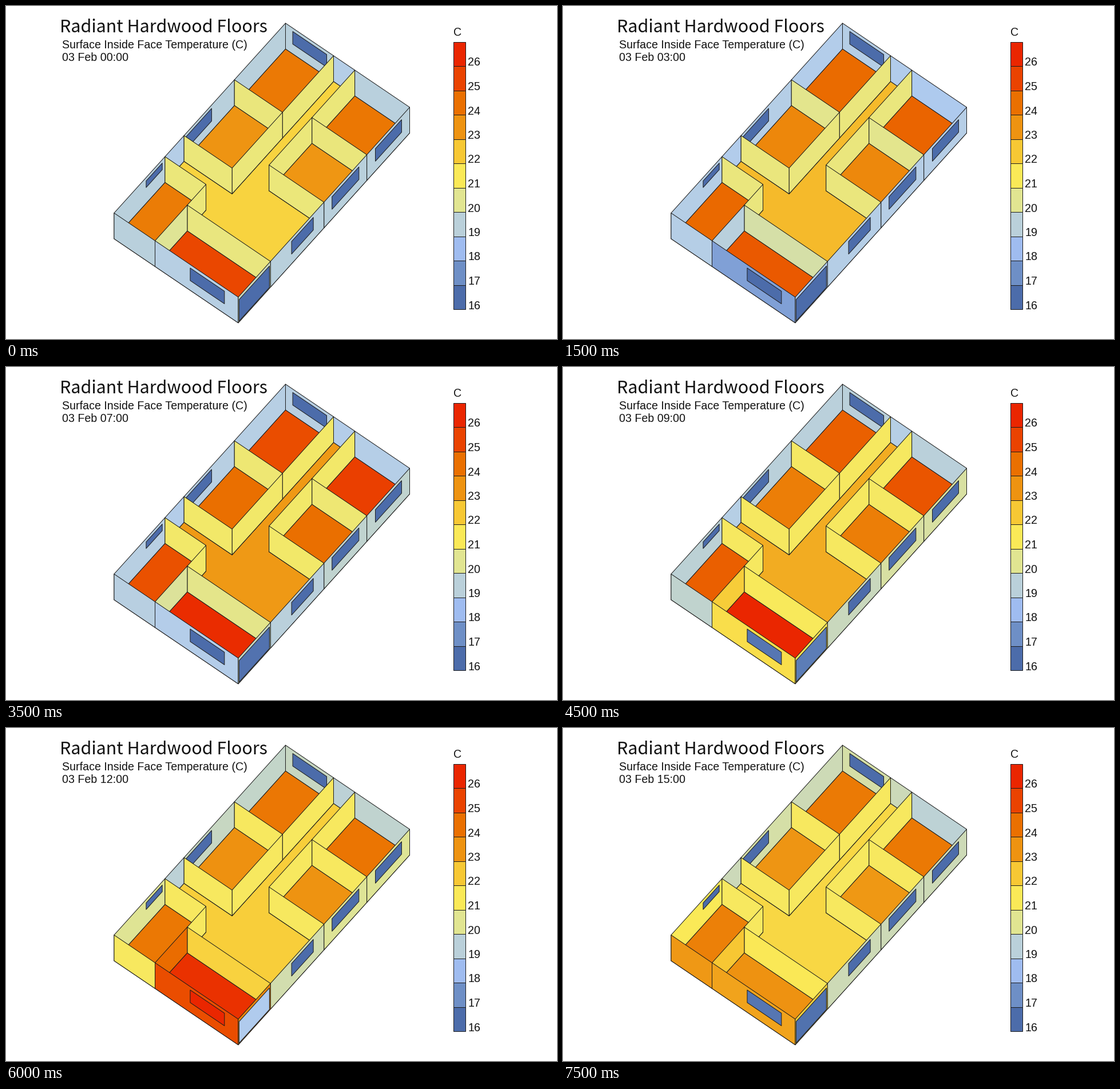
Recreate the animation shown at these times as a matplotlib script. Size 963 px wide and 582 px high, loop 8000 ms.

```python
import numpy as np
import matplotlib.pyplot as plt
from matplotlib.animation import FuncAnimation
from matplotlib.colors import to_rgb
from matplotlib.patches import Polygon, Rectangle

W, H, DPI = 963, 582, 96
HOURS, STEP_MS = 16, 500
INK = "#1c1c1c"

# Temperature scale, 16 to 26 degrees
SCALE = ["#4c6caa", "#6e8fc6", "#9fbcf0", "#bad0da", "#e1e591", "#fae957",
         "#f7c834", "#ee9311", "#ea7000", "#ea4300", "#ea2600"]
stops = dict(zip(range(16, 27), SCALE))
stops.update({18.5: "#b0cbee", 18.75: "#b7cfe4"})
STOP_T = sorted(stops)
STOP_RGB = np.array([to_rgb(stops[t]) for t in STOP_T])

# Plan axes on screen: u runs along the short side, v along the long side
ORIGIN = np.array([488, 29.5])
U, V = np.array([217, 147]), np.array([-299.6, 331.8])
DOWN = np.array([0, 1])
WALL = 45

# Partition lines of the plan
U1, U2, U3 = 0.387, 0.558, 0.33
V1, V2, V3, V4 = 0.298, 0.592, 0.703, 0.812
E1, E2 = 0.25, 0.5


def bump(centre, width):
    return lambda h: np.exp(-((h - centre) / width) ** 2)


# Daily influences on a surface
CYCLES = dict(
    night=bump(4.5, 3),
    heat=bump(6.5, 3.5),
    slow=bump(6.5, 4.5),
    am=bump(10.5, 3.5),
    noon=bump(12, 3.5),
    peak=bump(12, 1.6),
    pm=bump(15, 3.5),
    day=lambda h: 1 / (1 + np.exp(6 - h)),
)


def color(hour, base, gains):
    t = base + sum(k * CYCLES[name](hour) for name, k in gains.items())
    return [np.interp(t, STOP_T, STOP_RGB[:, i]) for i in range(3)]


fig = plt.figure(figsize=(W / DPI, H / DPI), dpi=DPI, facecolor="white")
ax = fig.add_axes([0, 0, 1, 1])
ax.set_xlim(-0.5, W - 0.5)
ax.set_ylim(H - 0.5, -0.5)
ax.axis("off")

surfaces = []


def at(p, drop=0):
    return ORIGIN + p[0] * U + p[1] * V + drop * DOWN


def add(pts, base, gains):
    poly = Polygon(pts, closed=True, ec=INK, lw=0.75, joinstyle="round",
                   zorder=2 + 0.01 * len(surfaces))
    ax.add_patch(poly)
    surfaces.append((poly, base, gains))


def floor(corners, base, **gains):
    add([at(c, WALL) for c in corners], base, gains)


def room(u0, v0, u1, v1, base, **gains):
    floor([(u0, v0), (u1, v0), (u1, v1), (u0, v1)], base, **gains)


def wall(p, q, base, top=0, height=WALL, **gains):
    add([at(p, top), at(q, top), at(q, top + height), at(p, top + height)],
        base, gains)


def outer(p, q, base=19, night=-0.4, **gains):
    wall(p, q, base, night=night, **gains)


def inner(p, q, night=-0.1):
    wall(p, q, 20.4, night=night, day=0.47)


def window(p, q, height=22, **gains):
    wall(p, q, 16, top=6, height=height, **gains)


def label(x, y, s, px=19.6, font="Liberation Sans"):
    return ax.text(x, y, s, fontsize=px * 72 / DPI, family=font,
                   color="#111111", va="baseline", ha="left", zorder=5)


# Floors
floor([(U1, 0), (U2, 0), (U2, E2), (1, E2), (1, V4), (U3, V4), (U3, V3),
       (0, V3), (0, V2), (U1, V2)], 21.5, slow=1.4)
room(0, 0, U1, V1, 23.7, heat=1.1)
room(0, V1, U1, V2, 22.95, heat=1.1)
room(U2, 0, 1, E1, 23.75, heat=1.4)
room(U2, E1, 1, E2, 22.9, heat=1.15)
room(0, V3, U3, 1, 23.5, slow=1.2)
room(U3, V4, 1, 1, 25, night=-1.2, heat=1.2, noon=1.9, pm=-2.9)

# Outer walls seen from inside
outer((0, 0), (0, V1), night=-0.5, pm=0.5)
outer((0, 0), (U1, 0), pm=0.7)
outer((0, V1), (0, V2), pm=0.7)
outer((0, V2), (0, V3), 18.7, night=-0.15, pm=0.75)
outer((U1, 0), (U2, 0), 18.7, night=-0.15, pm=0.75)
outer((U2, 0), (1, 0), night=-0.7, noon=0.15)
outer((0, V3), (0, 1), pm=2)
window((0.058, 0), (0.332, 0))
window((0, 0.431), (0, 0.582))
window((0, 0.719), (0, 0.813), height=11.5)

# Partitions, back to front
inner((U1, 0), (U1, V1))
inner((0, V1), (U1, V1), night=-0.45)
inner((U1, V1), (U1, V2))
inner((0, V2), (U1, V2))
inner((U2, 0), (U2, E1))
inner((U2, E1), (1, E1), night=-0.45)
inner((U2, E1), (U2, E2))
inner((U2, E2), (1, E2))
inner((0, V3), (U3, V3))
inner((U3, V3), (U3, V4))
wall((U3, V4), (1, V4), 20.4, night=-0.9, noon=1.3)
wall((U3, V4), (U3, 1), 20.1, night=-1.5, noon=4)

# Outer walls seen from outside
outer((1, 0), (1, E1), am=0.95, pm=0.3)
outer((1, E1), (1, E2), am=0.95, pm=0.3)
outer((1, E2), (1, V4), am=0.5, pm=0.4)
outer((0, 1), (U3, 1), pm=3.9)
outer((U3, 1), (1, 1), night=-2.1, noon=5.2, pm=1.2)
outer((1, V4), (1, 1), 19.5, night=-1.3, noon=3.6, pm=0.5)
for v0, v1 in [(0.047, 0.2), (0.296, 0.453), (0.562, 0.689)]:
    window((1, v0), (1, v1))
window((0.613, 1), (0.889, 1), peak=10)
window((1, 0.818), (1, 0.995), height=37.5, am=0.5, peak=2.1)

# Legend
CELL = 42.5
for i, c in enumerate(SCALE[::-1]):
    y = 62 + i * CELL
    ax.add_patch(Rectangle((781, y), 21, CELL, fc=c, ec=INK, lw=0.75))
    label(807, y + 42, str(26 - i))
label(781.5, 51.5, "C")

label(93, 46, "Radiant Hardwood Floors", 30.4, "Noto Sans CJK JP")
label(97, 73, "Surface Inside Face Temperature (C)")
clock = label(97, 95.5, "")


def update(hour):
    for poly, base, gains in surfaces:
        poly.set_facecolor(color(hour, base, gains))
    clock.set_text(f"03 Feb {hour:02d}:00")
    return [clock] + [s[0] for s in surfaces]


anim = FuncAnimation(fig, update, frames=HOURS, interval=STEP_MS, repeat=True)
plt.show()
```
